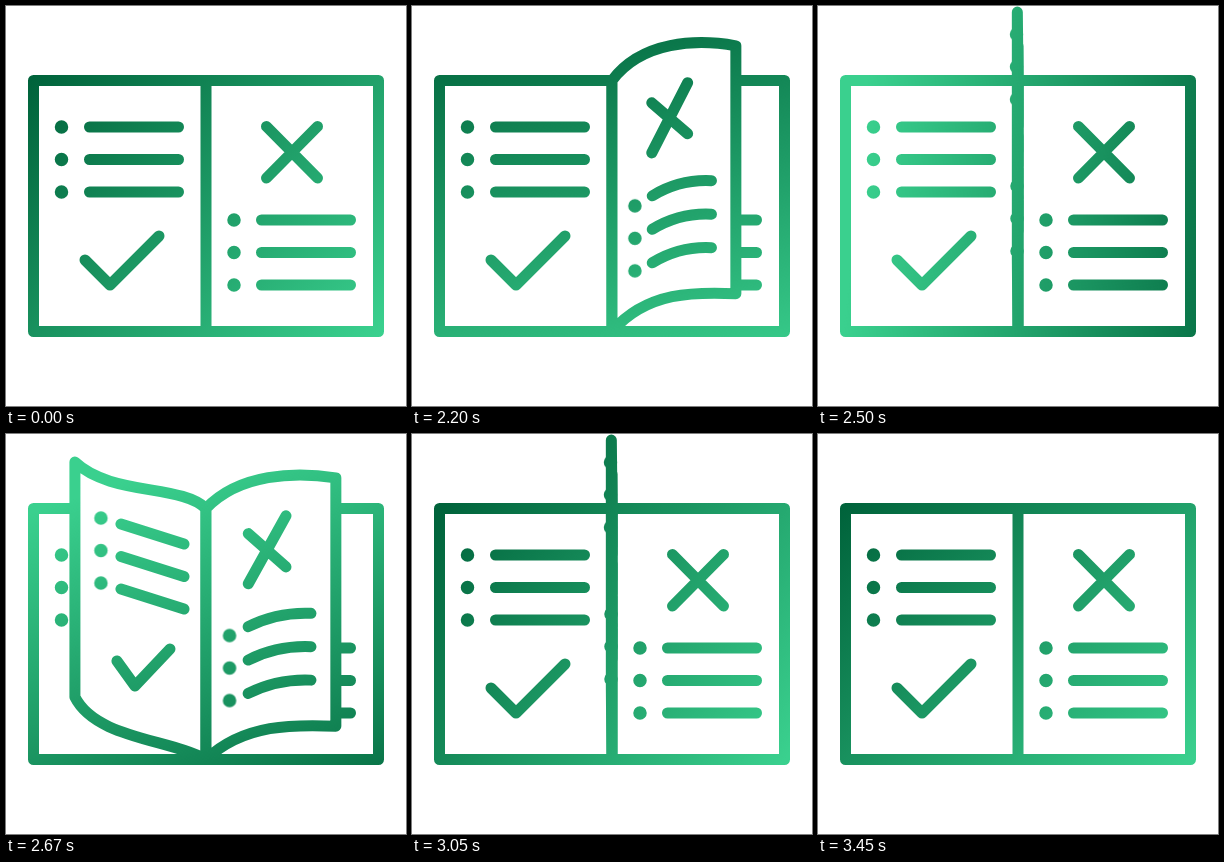
Recreate the animation shown at these times as an HTML page without scripts. Size 400 by 400 pixels, loop 3470 ms.

```html
<!DOCTYPE html>
<html lang="en">
<head>
<meta charset="utf-8">
<title>Turning pages</title>
<style>
html, body { margin: 0; width: 100%; height: 100%; overflow: hidden; background: #fff; }
.stage { position: relative; width: 400px; height: 400px; overflow: hidden; background: #fff; isolation: isolate; }
svg { display: block; }

/* Artwork is black on white; the screened gradient colours only the strokes. */
.tint {
  position: absolute; left: -275px; top: -291px; width: 1000px; height: 1000px;
  background: linear-gradient(135deg, #00633b 471px, #3ad08e 895px);
  mix-blend-mode: screen;
  animation: spin 3470ms linear infinite;
}
@keyframes spin {
  0%, 57.64% { transform: rotate(0deg); }
  60.5% { transform: rotate(9deg); }
  63.4% { transform: rotate(30deg); }
  72.05% { transform: rotate(140deg); }
  82.13% { transform: rotate(275deg); }
  88.47%, 100% { transform: rotate(360deg); }
}

path { fill: none; stroke: #000; stroke-width: 11; stroke-linecap: round; stroke-linejoin: round; }
.dots { stroke-width: 13.5; }
.sheet { fill: #fff; d: path("M200 74.5C260 74.5 320 74.5 372.5 74.5L372.5 325.5C320 325.5 260 325.5 200 325.5Z"); }
.front .dots { d: path("M228 214h0m0 32.5h0m0 32.5h0"); }
.front .lines { d: path("M255.5 214c30 0 60 0 89 0m-89 32.5c30 0 60 0 89 0m-89 32.5c30 0 60 0 89 0"); }
.front .mark { d: path("M260.5 120.5L311.5 172M311.5 120.5L260.5 172"); }
.back .dots { d: path("M55.5 121h0m0 32.5h0m0 32.5h0"); }
.back .lines { d: path("M83.5 121l89 0m-89 32.5l89 0m-89 32.5l89 0"); }
.back .mark { d: path("M79 254L104 279L153 230"); }

/* Both sheets share one flip; the second starts later. */
.page { --delay: 0ms; --lift: cubic-bezier(.4, .15, .8, .8); --settle: cubic-bezier(.2, .5, .5, 1); opacity: 0; }
.second { --delay: 550ms; }
.page .back { opacity: 0; }
.page, .page * { animation: 3470ms linear var(--delay) infinite; }
.page { animation-name: show; }
.page .front { animation-name: show-front; }
.page .back { animation-name: show-back; }
.page .sheet { animation-name: sheet; }
.page .front .dots { animation-name: front-dots; }
.page .front .lines { animation-name: front-lines; }
.page .front .mark { animation-name: front-mark; }
.page .back .dots { animation-name: back-dots; }
.page .back .lines { animation-name: back-lines; }
.page .back .mark { animation-name: back-mark; }
.page, .page g { animation-timing-function: step-end; }

@keyframes show { 0% { opacity: 0; } 57.64% { opacity: 1; } 83.57%, 100% { opacity: 0; } }
@keyframes show-front { 0% { opacity: 1; } 72.6%, 100% { opacity: 0; } }
@keyframes show-back { 0% { opacity: 0; } 72.05%, 100% { opacity: 1; } }

@keyframes sheet {
  0%, 57.64% { d: path("M200 74.5C260 74.5 320 74.5 372.5 74.5L372.5 325.5C320 325.5 260 325.5 200 325.5Z"); animation-timing-function: var(--lift); }
  63.4% { d: path("M200 74.5C230 35 285 33 324.5 40L324.5 288C285 286 235 285 200 325.5Z"); }
  66.28% { d: path("M200 74.5C200 25 235 14 262 22L262 258C225 268 205 285 200 325.5Z"); }
  72.05% { d: path("M200 74.5C200 50 200 25 200 6L200 254C200 280 200 300 200 325.5Z"); }
  76.95% { d: path("M200 74.5C175 50 105 62 69 28L69 263C90 305 165 305 200 325.5Z"); animation-timing-function: var(--settle); }
  82.13% { d: path("M200 74.5C150 70 75 70 29 60L29 308C80 320 150 322 200 325.5Z"); }
  83.57%, 100% { d: path("M200 74.5C140 74.5 80 74.5 27.5 74.5L27.5 325.5C80 325.5 140 325.5 200 325.5Z"); }
}
@keyframes front-dots {
  0%, 57.64% { transform: translate(0, 0); animation-timing-function: var(--lift); }
  63.4% { transform: translate(-5px, -14px); }
  66.28% { transform: translate(-14px, -28px); }
  72.05%, 100% { transform: translate(-29px, -34px); }
}
@keyframes front-lines {
  0%, 57.64% { d: path("M255.5 214c30 0 60 0 89 0m-89 32.5c30 0 60 0 89 0m-89 32.5c30 0 60 0 89 0"); animation-timing-function: var(--lift); }
  63.4% { d: path("M240.5 190c20-12 40-16 59.5-15m-59.5 48.5c20-12 40-16 59.5-15m-59.5 48.5c20-12 40-16 59.5-15"); }
  66.28% { d: path("M221 174c5-11 15-23 26-22m-26 55c5-11 15-23 26-22m-26 55c5-11 15-23 26-22"); }
  72.05%, 100% { d: path("M200 160c0-10 0-20 0-30m0 62.5c0-10 0-20 0-30m0 62.5c0-10 0-20 0-30"); }
}
@keyframes front-mark {
  0%, 57.64% { d: path("M260.5 120.5L311.5 172M311.5 120.5L260.5 172"); animation-timing-function: var(--lift); }
  63.4% { d: path("M240 97L276 128M276 77L240 147"); }
  66.28% { d: path("M218 83L239 104M238 52L218 135"); }
  72.05%, 100% { d: path("M200 70L200 85M200 40L200 120"); }
}
@keyframes back-dots {
  0%, 72.05% { transform: translate(143.5px, -93px); }
  76.95% { transform: translate(39.5px, -37px); animation-timing-function: var(--settle); }
  82.13% { transform: translate(3px, -11.5px); }
  83.57%, 100% { transform: translate(0, 0); }
}
@keyframes back-lines {
  0%, 72.05% { d: path("M200 40l0 40m0-7.5l0 40m0-7.5l0 40"); }
  76.95% { d: path("M115 90l63 20m-63 12.5l63 20m-63 12.5l63 20"); animation-timing-function: var(--settle); }
  82.13% { d: path("M86.5 111.5l87.5 6.5m-87.5 26l87.5 6.5m-87.5 26l87.5 6.5"); }
  83.57%, 100% { d: path("M83.5 121l89 0m-89 32.5l89 0m-89 32.5l89 0"); }
}
@keyframes back-mark {
  0%, 72.05% { d: path("M200 200L200 215L200 190"); }
  76.95% { d: path("M111 227L129 252L164 215"); animation-timing-function: var(--settle); }
  82.13% { d: path("M83 246L108 271L155 226"); }
  83.57%, 100% { d: path("M79 254L104 279L153 230"); }
}
</style>
</head>
<body>
<div class="stage">
  <svg width="400" height="400" viewBox="0 0 400 400">
    <g class="book">
      <path d="M27.5 74.5H372.5V325.5H27.5Z"/>
      <path d="M200 74.5V325.5" stroke-width="12"/>
      <g class="front"><path class="dots"/><path class="lines"/><path class="mark"/></g>
      <g class="back"><path class="dots"/><path class="lines"/><path class="mark"/></g>
    </g>
    <g class="page first">
      <path class="sheet"/>
      <g class="front"><path class="dots"/><path class="lines"/><path class="mark"/></g>
      <g class="back"><path class="dots"/><path class="lines"/><path class="mark"/></g>
    </g>
    <g class="page second">
      <path class="sheet"/>
      <g class="front"><path class="dots"/><path class="lines"/><path class="mark"/></g>
      <g class="back"><path class="dots"/><path class="lines"/><path class="mark"/></g>
    </g>
  </svg>
  <div class="tint"></div>
</div>
</body>
</html>
```
